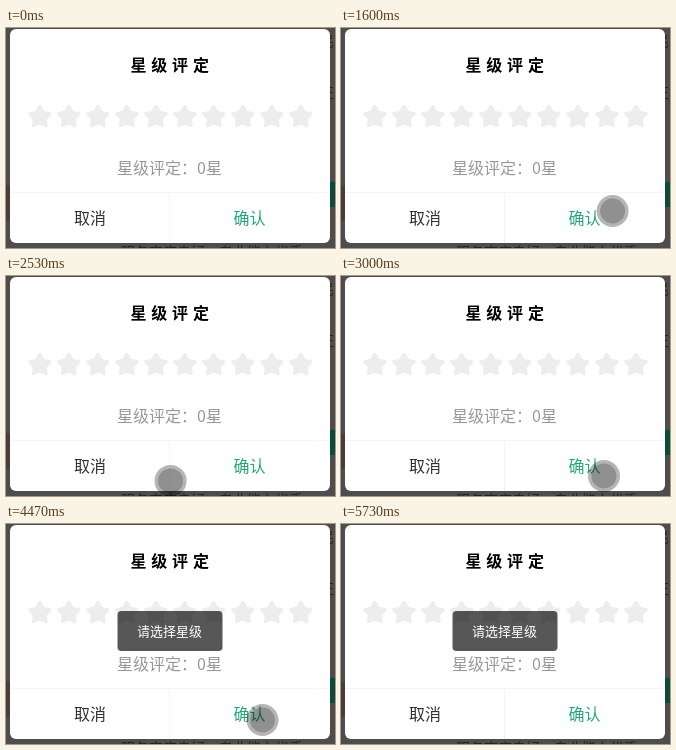
Animation, 329 px wide and 220 px high, one loop 6.67 s. Source, as an HTML page:

```html
<!DOCTYPE html>
<html lang="zh-CN">
<head>
<meta charset="utf-8">
<title>星级评定</title>
<style>
  html, body { margin: 0; width: 100%; height: 100%; overflow: hidden; background: #4d4d4d; }
  svg { display: block; width: 100vw; height: 100vh; }
  text { font: 16px "Noto Sans CJK SC", "Noto Sans CJK", sans-serif; }
  .mid { text-anchor: middle; }
  .title { font-weight: 700; letter-spacing: 4.8px; }
  .behind { font-size: 14px; fill: #222; }
  .tip { font-size: 13px; font-weight: 500; fill: #fff; }
</style>
</head>
<body>
<svg viewBox="0 0 329 220">
  <rect width="329" height="220" fill="#4d4d4d"/>
  <text class="behind" x="314" y="18">民</text>
  <text class="behind" x="314" y="70">正</text>
  <text class="behind" x="68" y="229">一、</text>
  <text class="behind" x="115" y="229">服务态度良好，专业能力优秀</text>
  <rect x="-4" y="157" width="9" height="36" rx="4" fill="#4a3d3a"/>
  <rect x="318" y="154" width="11" height="25" fill="#0a4c37"/>

  <rect x="4" y="1" width="320" height="214" rx="6" fill="#fff"/>
  <path id="pressed" d="M164 165H324V209a6 6 0 0 1-6 6H164Z" fill="#f2f3f5"/>
  <path d="M4 164.5H324M163.5 165V215" stroke="#f4f5f6"/>
  <text class="title" x="124.5" y="43">星级评定</text>
  <g id="stars" fill="#ededed" stroke="#ededed" stroke-width="3" stroke-linejoin="round"></g>
  <text class="mid" x="163.5" y="146" fill="#969799">星级评定：0星</text>
  <text class="mid" x="84" y="196" fill="#323233">取消</text>
  <text class="mid" x="243.5" y="196" fill="#26a67c">确认</text>

  <g id="toast">
    <rect x="111.5" y="87" width="105" height="40" rx="4" fill-opacity=".66"/>
    <text class="mid tip" x="163.5" y="111.5">请选择星级</text>
  </g>
  <g id="cursor">
    <circle r="16" fill-opacity=".29"/>
    <circle r="12.5" fill-opacity=".2"/>
  </g>
</svg>
<script>
const LOOP = 6670;
const FPS = 15;
const PRESS = 3130, RELEASE = 3200, LEAVE = 5730;
const byId = id => document.getElementById(id);
const show = (id, on) => byId(id).setAttribute('visibility', on ? 'visible' : 'hidden');
const mix = (a, b, k) => a + (b - a) * k;

function starPath(cx, cy) {
  const points = Array.from({ length: 10 }, (_, i) => {
    const r = i % 2 ? 5.8 : 10.8;
    const a = (i / 5 - 0.5) * Math.PI;
    return `${cx + r * Math.cos(a)} ${cy + r * Math.sin(a)}`;
  });
  return `<path d="M${points.join('L')}Z"/>`;
}
byId('stars').innerHTML =
  Array.from({ length: 10 }, (_, i) => starPath(33.8 + i * 29, 89)).join('');

// Pointer strokes; it rests between them
const entry = { at: 670, x: 316, y: 208 };
const strokes = [
  { at: 670, end: 800, x: 102, y: 159 },
  { at: 1000, end: 1730, x: 307, y: 188 },
  { at: 1730, end: 2130, x: 254, y: 202 },
  { at: 2130, end: 2530, x: 163, y: 205 },
  { at: 2530, end: 3000, x: 263, y: 200 },
  { at: 3530, end: 3670, x: 241, y: 195 },
  { at: 4130, end: 4330, x: 268, y: 198 },
  { at: 4330, end: 4470, x: 256.5, y: 196 },
  { at: 5200, end: 5330, x: 248, y: 200 },
  { at: 5470, end: 5670, x: 208, y: 211 }
];

function pointerAt(ms) {
  let { x, y } = entry;
  for (const s of strokes) {
    const k = Math.min(1, Math.max(0, (ms - s.at) / (s.end - s.at)));
    x = mix(x, s.x, k);
    y = mix(y, s.y, k);
  }
  return [x, y];
}

function render(time) {
  // Small margin keeps rounded times on their own tick
  const tick = Math.floor(time % LOOP * FPS / 1000 + 0.06);
  const ms = tick * 1000 / FPS + 4;
  byId('cursor').setAttribute('transform', `translate(${pointerAt(ms)})`);
  show('cursor', ms >= entry.at && ms < LEAVE);
  show('pressed', ms >= PRESS && ms < RELEASE);
  show('toast', ms >= RELEASE);
}

let start;
function loop(now) {
  start ??= now;
  render(now - start);
  requestAnimationFrame(loop);
}
render(0);
requestAnimationFrame(loop);
</script>
</body>
</html>
```
